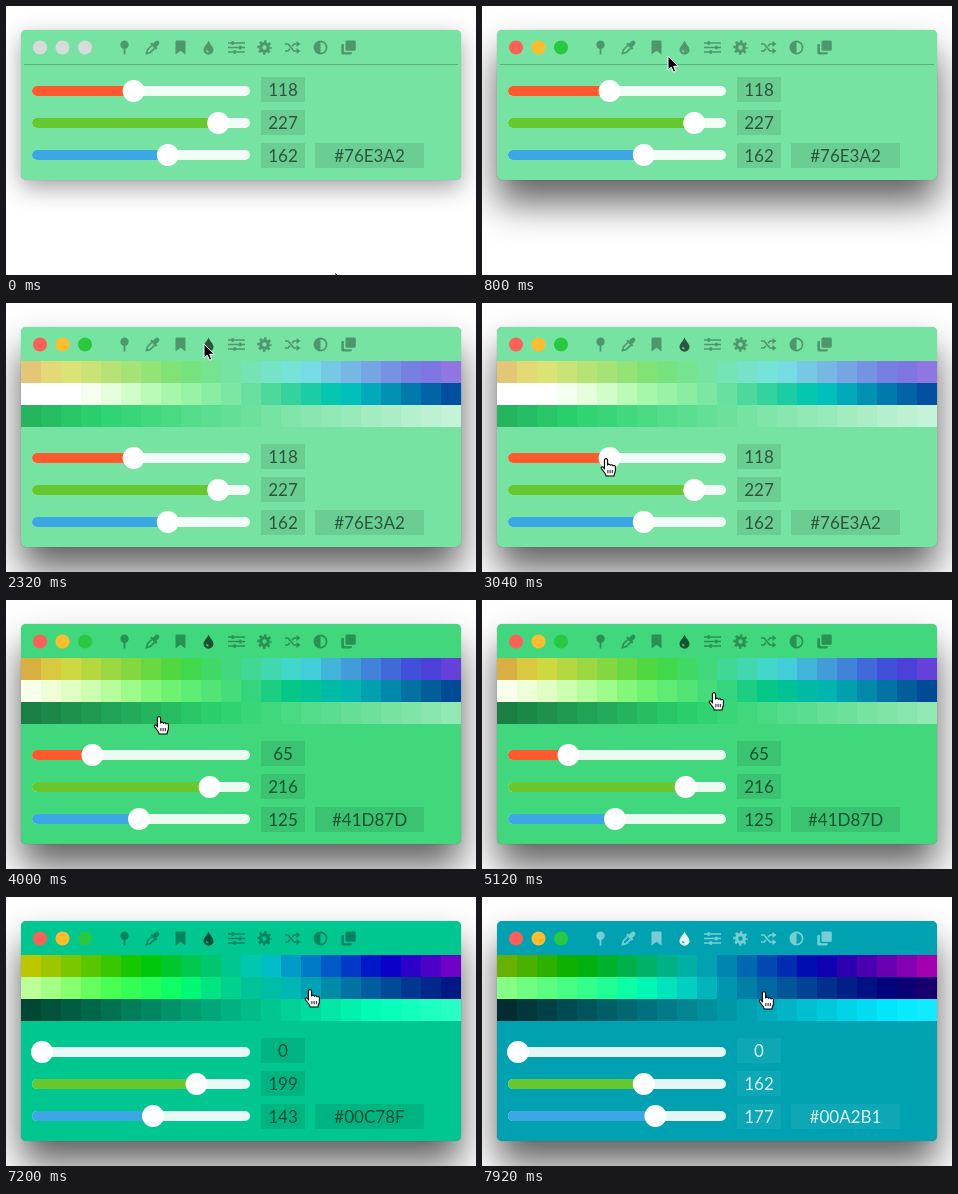
Write an HTML page that moves like this. It is 470 by 269 pixels and loops after 8000 ms.

```html
<!DOCTYPE html>
<html lang="en">
<head>
<meta charset="utf-8">
<title>Color picker</title>
<style>
  html, body { margin: 0; width: 100%; height: 100%; overflow: hidden; background: #fff; }
  #window { position: absolute; left: 15px; top: 24px; width: 440px; border-radius: 5px; }
  #window { box-shadow: 0 0 1px rgba(0,0,0,.3), 0 8px 23px rgba(0,0,0,.36); }
  #window.focused { box-shadow: 0 0 1px rgba(0,0,0,.4), 0 23px 37px rgba(0,0,0,.62); }
  svg { position: absolute; left: 0; top: 0; }
  text { font: 17px Lato, sans-serif; text-anchor: middle; fill: currentColor; }
  .line { fill: none; stroke: currentColor; stroke-width: 1.7; }
  #icons, #drop, #boxes { fill: currentColor; }
</style>
</head>
<body>
<div id="window"></div>
<svg id="stage" width="470" height="269" viewBox="0 0 470 269">
  <clipPath id="frame"><rect id="frameRect" x="15" y="24" width="440" height="150" rx="5"/></clipPath>
  <path id="divider" d="M18 58.5H452" stroke="currentColor" opacity=".22"/>
  <g clip-path="url(#frame)"><g id="swatches" shape-rendering="crispEdges"></g></g>
  <g id="lights"></g>
  <g id="icons">
    <g transform="translate(118.5 41.5)"><circle cy="-2.8" r="4.2"/><path d="M-.9 1H.9V7H-.9Z"/></g>
    <g transform="translate(146.5 41.5) rotate(45)">
      <path d="M-2.3-6.5a2.3 2.3 0 0 1 4.6 0V-3H4V-.8H-4V-3H-2.3Z"/>
      <path class="line" d="M-2-.8V5L0 8.5 2 5V-.8"/>
    </g>
    <path transform="translate(174.5 41.5)" d="M-5-6Q-5-7-4-7H4Q5-7 5-6V7L0 3.2-5 7Z"/>
    <g transform="translate(230.5 41.5)">
      <path class="line" style="stroke-width:1.4" d="M-8.5-4.5H8.5M-8.5 0H8.5M-8.5 4.5H8.5"/>
      <path d="M-5-6.2h2.4v3.4H-5ZM2.6-1.7H5V1.7H2.6ZM-3 2.8H-.6V6.2H-3Z"/>
    </g>
    <g transform="translate(258.5 41.5)">
      <circle class="line" r="3.8" style="stroke-width:3.2"/>
      <circle class="line" r="6" style="stroke-width:2.6" stroke-dasharray="2.36" stroke-dashoffset="1.18"/>
    </g>
    <g transform="translate(286.5 41.5)">
      <path class="line" d="M-7.5-3.5H-4.5L1.5 3.5H5M-7.5 3.5H-4.5L-2.6 1.3M-.6-1.2L1.5-3.5H5"/>
      <path d="M4-6.5L8-3.5 4-.5ZM4 .5L8 3.5 4 6.5Z"/>
    </g>
    <g transform="translate(314.5 41.5)"><circle class="line" r="6.1"/><path d="M0-6a6 6 0 0 0 0 12Z"/></g>
    <g transform="translate(342.5 41.5)">
      <rect x="-3" y="-7" width="10.3" height="10.3" rx="1.4"/>
      <path d="M-4.6-3.6H-5.8Q-7.2-3.6-7.2-2.2V5.6Q-7.2 7-5.8 7H2Q3.4 7 3.4 5.6V4.8H-3Q-4.6 4.8-4.6 3.2Z"/>
    </g>
  </g>
  <g id="drop" transform="translate(202.5 41.5)">
    <path fill-rule="evenodd" d="M0-7C1.2-3.4 5-.8 5 2.3A5 4.9 0 0 1-5 2.3C-5-.8-1.2-3.4 0-7ZM-2.2 2.2A2.2 2.2 0 0 0 0 4.8V3.8A1.3 1.3 0 0 1-1.2 2.2Z"/>
  </g>
  <g id="body">
    <g id="sliders"></g>
    <g id="boxes"></g>
    <g id="labels"></g>
  </g>
  <g id="pointer">
    <path id="arrow" d="M0 0V14.2L3.3 11.2 5.5 16.2 7.8 15.2 5.7 10.3H10.2Z" stroke="#fff" stroke-width="1"/>
    <g id="hand" stroke="#000" stroke-width="1.1" fill="#fff" stroke-linejoin="round">
      <path d="M-1.6 10V1.2a1.6 1.6 0 0 1 3.2 0V6a1.5 1.5 0 0 1 2.8.3a1.5 1.5 0 0 1 2.6.6a1.4 1.4 0 0 1 2.4 1V11.5c0 2-1.2 3-1.4 5.5H.2C0 14.5-2.6 12.5-4.6 9.5c-.8-1.4 1-2.4 2-1.2Z"/>
      <path d="M1.9 11v3.2M4.1 11v3.2M6.3 11v3.2" stroke-width=".9"/>
    </g>
  </g>
</svg>
<script>
const LOOP = 8000, TICK = 80, COLUMNS = 22, PANEL = 70;
const FOCUS_AT = 560, OPEN_AT = 1971, OPEN_TIME = 300, INVERT_AT = 7440;

const picks = [
  [0, [118, 227, 162]], [4000, [65, 216, 125]], [5840, [72, 221, 124]],
  [6480, [0, 199, 143]], [7440, [0, 162, 177]],
];
// time, x, y of the pointer tip
const route = [
  [0, 329, 266], [800, 186, 50], [1200, 204, 46], [1760, 198, 41], [2320, 198, 41],
  [2840, 141, 139], [3040, 124, 156], [3120, 124, 156], [3680, 153, 117], [4480, 153, 117],
  [4800, 202, 88], [5120, 232, 93], [5760, 232, 93], [6240, 308, 93], [6800, 308, 93],
  [6960, 303, 94], [7040, 303, 94], [7200, 304, 93], [7760, 304, 93], [7920, 282, 95],
];

const $ = id => document.getElementById(id);
const clamp = v => Math.min(1, Math.max(0, v));
const mix = (a, b, k) => a + (b - a) * k;
const smooth = v => { const k = clamp(v); return k * k * (3 - 2 * k); };

function add(parent, tag, attrs) {
  const node = document.createElementNS('http://www.w3.org/2000/svg', tag);
  for (const name in attrs) node.setAttribute(name, attrs[name]);
  return $(parent).appendChild(node);
}

const lights = [34, 56.5, 79].map(cx => add('lights', 'circle', { cx, cy: 41.5, r: 7 }));
const cells = Array.from({ length: 3 * COLUMNS }, (_, n) => add('swatches', 'rect', {
  x: 15 + 20 * (n % COLUMNS), y: 58 + 22 * Math.floor(n / COLUMNS), width: 20, height: 22,
}));
const sliders = ['#ff5a2d', '#66c72f', '#3ba7e5'].map((fill, n) => {
  const cy = 85 + 32 * n;
  const bar = { x: 26, y: cy - 5, height: 10, rx: 5 };
  add('sliders', 'rect', { ...bar, width: 218, fill: '#fff', opacity: .9 });
  return {
    fill: add('sliders', 'rect', { ...bar, fill }),
    knob: add('sliders', 'circle', { cy, r: 11, fill: '#fff' }),
  };
});
const labels = [[255, 71, 44], [255, 104, 44], [255, 137, 44], [309, 137, 109]].map(([x, y, width]) => {
  add('boxes', 'rect', { x, y, width, height: 25 });
  return add('labels', 'text', { x: x + width / 2, y: y + 19 });
});

function toHsl(rgb) {
  const [r, g, b] = rgb.map(c => c / 255);
  const max = Math.max(r, g, b), min = Math.min(r, g, b), span = max - min;
  const sector = max === r ? (g - b) / span : max === g ? 2 + (b - r) / span : 4 + (r - g) / span;
  const l = (max + min) / 2;
  return { h: sector * 60, s: span / (1 - Math.abs(2 * l - 1)), l, sv: span / max, v: max };
}

const hsl = (h, s, l) => `hsl(${h} ${100 * clamp(s)}% ${100 * clamp(l)}%)`;

function hsv(h, s, v) {
  const l = v * (1 - clamp(s) / 2);
  return hsl(h, (v - l) / Math.min(l, 1 - l), l);
}

const rows = [
  (c, i) => hsl(c.h + 10 * (i - 10), c.s, c.l),
  (c, i) => {
    const d = i - 10.5;
    return d < 0
      ? hsl(c.h + 6.1 * d, c.s - .05 * d, c.l - .039 * d)
      : hsv(c.h + 6.3 * d, c.sv + .11 * d, c.v - .025 * d);
  },
  (c, i) => hsl(c.h, c.s, c.l + (i - 12) / 48),
];

let shown;
function showColor(rgb) {
  if (rgb === shown) return;
  shown = rgb;
  const base = toHsl(rgb);
  $('window').style.background = `rgb(${rgb})`;
  cells.forEach((cell, n) => cell.setAttribute('fill', rows[Math.floor(n / COLUMNS)](base, n % COLUMNS)));
  sliders.forEach(({ fill, knob }, n) => {
    const x = 36 + rgb[n] * 198 / 255;
    knob.setAttribute('cx', x);
    fill.setAttribute('width', rgb[n] ? x - 26 : 0);
    labels[n].textContent = rgb[n];
  });
  labels[3].textContent = '#' + rgb.map(c => c.toString(16).padStart(2, '0')).join('').toUpperCase();
}

function pointerAt(t) {
  const n = route.findIndex(stop => stop[0] > t);
  if (n < 0) return route[route.length - 1].slice(1);
  const [t0, x0, y0] = route[n - 1], [t1, x1, y1] = route[n];
  const k = smooth((t - t0) / (t1 - t0));
  return [mix(x0, x1, k), mix(y0, y1, k)];
}

function draw(t) {
  const open = smooth((t - OPEN_AT) / OPEN_TIME);
  const light = clamp((t - INVERT_AT + TICK) / 320);
  const focused = t >= FOCUS_AT;
  const shade = Math.round(255 * light);

  showColor(picks.filter(([at]) => at <= t).pop()[1]);
  $('window').className = focused ? 'focused' : '';
  $('window').style.height = 150 + PANEL * open + 'px';
  $('frameRect').setAttribute('height', 150 + PANEL * open);
  $('swatches').setAttribute('transform', `translate(0 ${PANEL * (open - 1)})`);
  $('swatches').setAttribute('opacity', open);
  $('body').setAttribute('transform', `translate(0 ${PANEL * open})`);
  lights.forEach((dot, n) => dot.setAttribute('fill', focused ? ['#ff5f57', '#ffbd2e', '#28c940'][n] : '#d9dbda'));

  $('stage').style.color = `rgb(${shade},${shade},${shade})`;
  const iconAlpha = mix(.33, .47, light);
  $('icons').setAttribute('opacity', iconAlpha);
  $('drop').setAttribute('opacity', t >= 2000 ? mix(.62, .92, light) : iconAlpha);
  $('labels').setAttribute('opacity', mix(.58, .86, light));
  $('boxes').setAttribute('opacity', mix(.09, .05, light));

  const [x, y] = pointerAt(t);
  const overSwatch = open === 1 && y >= 58 && y < 124;
  const overSlider = open === 1 && x < 244 && Math.abs(y - 155) < 11;
  const hand = overSwatch || overSlider;
  $('hand').style.display = hand ? '' : 'none';
  $('arrow').style.display = hand ? 'none' : '';
  $('pointer').setAttribute('transform', `translate(${x} ${y})`);
}

const start = performance.now();
function play() {
  const t = (performance.now() - start) % LOOP;
  draw(Math.floor(t / TICK) * TICK);
  requestAnimationFrame(play);
}
play();
</script>
</body>
</html>
```
